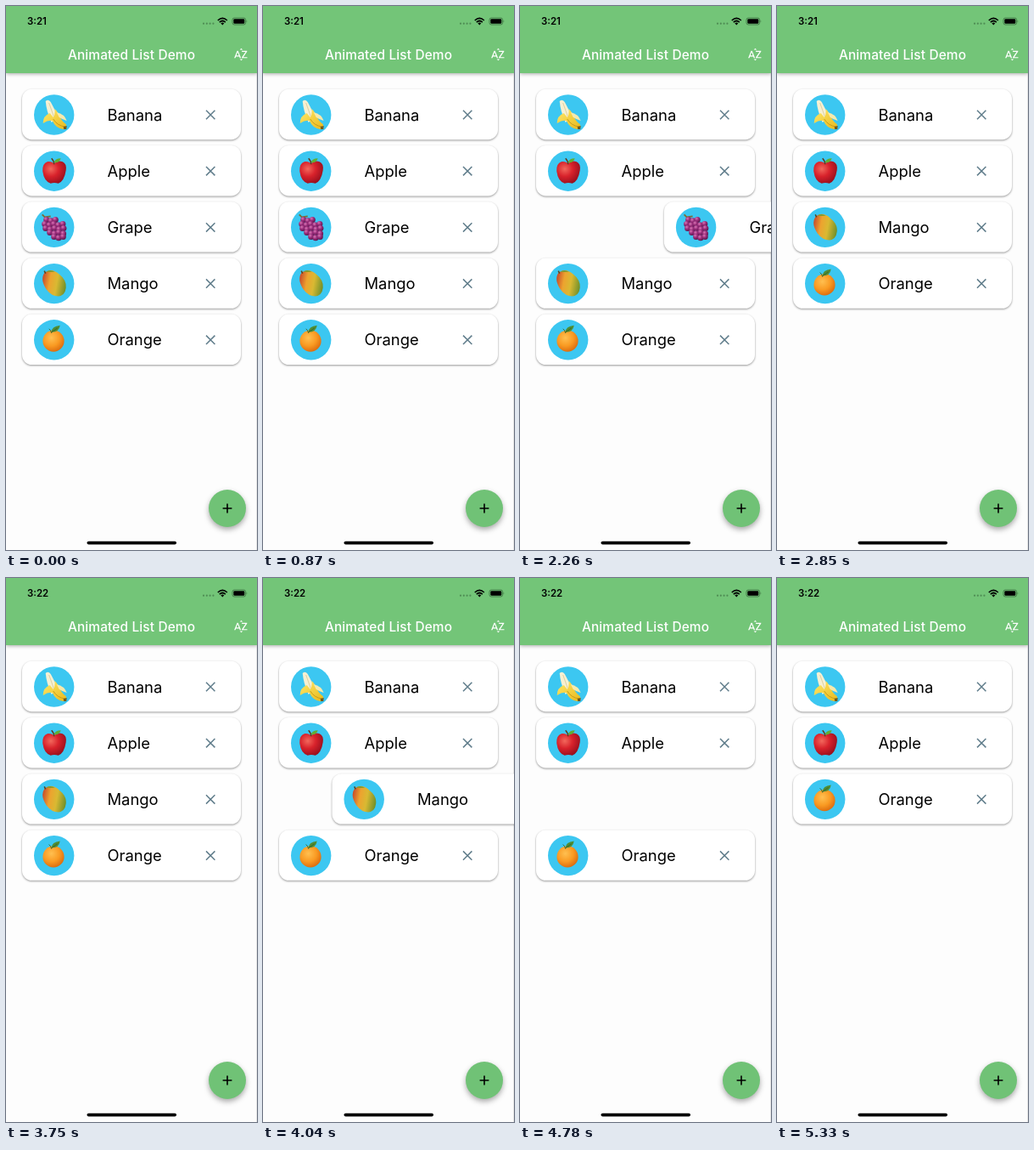
An HTML page for the animation above (6.03 s loop, 296 px wide and 640 px high).

```html
<!DOCTYPE html>
<html lang="en">
<head>
<meta charset="utf-8">
<title>Animated List Demo</title>
<style>
  html, body { margin: 0; width: 100%; height: 100%; overflow: hidden; background: #fdfdfd; }
  svg { display: block; width: 296px; height: 640px; font-family: Inter, Roboto, sans-serif; }
  .bar { filter: drop-shadow(0 1px 2px #0005); }
  .card { fill: #fff; filter: drop-shadow(0 1px 1px #0006); }
  .label { font-size: 18.4px; }
  .cross { fill: none; stroke: #607d8b; stroke-width: 1.5; }
  .fab { filter: drop-shadow(0 3px 3px #0005); }
</style>
</head>
<body>
<svg viewBox="0 0 296 640">
  <defs>
    <radialGradient id="red" cx=".35" cy=".35" r=".75">
      <stop stop-color="#f2685c"/><stop offset=".45" stop-color="#d8222b"/><stop offset="1" stop-color="#8f0d1c"/>
    </radialGradient>
    <radialGradient id="orange" cx=".4" cy=".35" r=".7">
      <stop stop-color="#ffc051"/><stop offset=".55" stop-color="#f99a22"/><stop offset="1" stop-color="#d9680d"/>
    </radialGradient>
    <radialGradient id="grape" cx=".35" cy=".3" r=".75">
      <stop stop-color="#d977b4"/><stop offset=".45" stop-color="#9c2f7d"/><stop offset="1" stop-color="#581449"/>
    </radialGradient>
    <linearGradient id="mango" x1="0" y1=".4" x2="1" y2=".6">
      <stop stop-color="#c9502b"/><stop offset=".3" stop-color="#eda32f"/>
      <stop offset=".6" stop-color="#d9b932"/><stop offset="1" stop-color="#71902a"/>
    </linearGradient>
    <linearGradient id="peel" x2="1" y2="1">
      <stop stop-color="#ffe96b"/><stop offset="1" stop-color="#e8b91c"/>
    </linearGradient>
  </defs>

  <rect width="296" height="640" fill="#fdfdfd"/>
  <path d="M295.5 79V640" stroke="#e6e6e6"/>
  <path class="bar" d="M0 0H296V79H0Z" fill="#73c578"/>
  <text id="clock" x="25" y="22.3" font-size="11.4" font-weight="600"></text>
  <g fill="#4f8c54">
    <circle cx="233" cy="20.7" r="1.1"/><circle cx="236.8" cy="20.7" r="1.1"/>
    <circle cx="240.6" cy="20.7" r="1.1"/><circle cx="244.4" cy="20.7" r="1.1"/>
  </g>
  <g fill="none" stroke="#000" stroke-width="1.7">
    <path d="M249.8 17Q255.3 11.8 260.8 17M251.8 19.1Q255.3 15.9 258.8 19.1"/>
  </g>
  <path d="M253.3 20.3Q255.3 18.6 257.3 20.3L255.3 22.4Z"/>
  <rect x="267" y="14" width="15.6" height="8" rx="2.3" fill="none" stroke="#3f7443" stroke-width=".9"/>
  <rect x="268.3" y="15.3" width="13" height="5.4" rx="1.2"/>
  <path d="M283.6 16.6Q285.2 18 283.6 19.4Z" fill="#3f7443"/>

  <text x="148" y="62.5" font-size="15.4" font-weight="500" letter-spacing=".15" text-anchor="middle" fill="#fff">Animated List Demo</text>
  <path transform="translate(267.9 47.9) scale(.759)" fill="#fff" d="M14.94 4.66h-4.72l2.36-2.36zM10.25 19.37h4.66l-2.33 2.33zM6.1 6.27L1.6 17.73h1.84l.92-2.45h5.11l.92 2.45h1.84L7.74 6.27zM4.97 13.64l1.94-5.18 1.94 5.18zM15.73 16.14h6.12v1.59h-8.53v-1.29l5.92-8.56h-5.88v-1.6h8.3v1.26z"/>

  <g id="list"></g>

  <circle class="fab" cx="261" cy="591" r="22" fill="#70c276"/>
  <path d="M255.6 591H266.4M261 585.6V596.4" stroke="#000" stroke-width="1.6"/>
  <rect x="95.5" y="629.7" width="105.5" height="3.8" rx="1.9"/>
</svg>
<script>
const LOOP = 6030, PITCH = 66.2, SPEED = 0.288, SLIDE = 1000;

// Removed items slide out linearly, then the rows below jump up.
const removeAt = { Grape: 1736, Mango: 3813 };
// Moments at which the screen refreshes.
const ticks = [0, 1830, 1930, 2040, 2150, 2260, 2460, 2630, 2740, 2850, 3020,
  3920, 4030, 4140, 4240, 4360, 4610, 4780, 4890, 5010];

const path = (d, fill, extra = '') => `<path d="${d}" fill="${fill}" ${extra}/>`;

function grapes() {
  const rows = [[-9, -9, 3], [-11, -4, 5], [-10, 1, 5], [-5, 6, 4], [0, 11, 3]];
  return path('M-14 -15L-8 -9M-11 -12L-4 -13', 'none', 'stroke="#7d6a35" stroke-width="1.8"') +
    rows.map(([x, y, n]) => Array.from({ length: n }, (_, i) =>
      `<circle cx="${x + i * 5.3}" cy="${y + i % 2 * 1.4}" r="3.5" fill="url(#grape)"/>`).join('')).join('');
}

const fruits = {
  Banana:
    path('M-10 -16Q-7 -19 -4 -15L5 2L-3 9Q-9 -4 -10 -16Z', '#f7f0d2') +
    path('M-6 -14L0 3', 'none', 'stroke="#ddd0a0"') +
    path('M-5 -2Q-13 1 -13 10Q-7 6 -2 7Q2 16 11 17Q16 16 14 11Q8 7 6 0Q3 -5 1 -7Q1 1 -1 3Z', 'url(#peel)') +
    path('M3 -3Q12 -1 15 7Q9 5 6 3Z', '#f6e9ac') +
    path('M-1 5Q4 13 13 14', 'none', 'stroke="#c99b16"') +
    path('M11 14L15 13L14.5 17L11.5 17Z', '#6e5a20'),
  Apple:
    path('M0 -9Q4 -13 10 -11Q15 -9 14 -1Q12 12 5 14.5Q0 13 -4 14.5Q-12 12 -13.5 0Q-14 -9 -8 -11Q-4 -12 0 -9Z', 'url(#red)') +
    path('M0 -8Q0 -12 -3 -15', 'none', 'stroke="#5b3a1d" stroke-width="1.5"') +
    path('M0 -10Q1 -15 8 -15Q6 -9 0 -10Z', '#5fae35'),
  Grape: grapes(),
  Mango:
    path('M-11 -13Q-3 -19 6 -11Q15 -4 14 5Q13 14 5 15Q-3 15 -9 7Q-17 -5 -11 -13Z', 'url(#mango)') +
    path('M-9 -14Q-5 -17 1 -14Q-5 -13 -9 -14Z', '#7e9c31') +
    path('M-10 -12L-11.5 -15', 'none', 'stroke="#59441f" stroke-width="1.5"'),
  Orange:
    '<circle cx="-.7" cy="1.3" r="12.6" fill="url(#orange)"/>' +
    path('M-3 -9Q-3 -16 7 -17Q6 -9 -3 -9Z', '#4f8d35') +
    path('M-3 -8Q-4 -12 -6 -13M-3 -9L4 -14', 'none', 'stroke="#38662a"')
};

const list = document.getElementById('list');
const clock = document.getElementById('clock');
const names = Object.keys(fruits);

list.innerHTML = names.map(name => `<g>
  <rect class="card" x="19" y="97.8" width="258" height="59.4" rx="11.5"/>
  <circle cx="56.7" cy="128" r="23.7" fill="#3cc7f1"/>
  <g transform="translate(56.7 128)">${fruits[name]}</g>
  <text class="label" x="119.5" y="134.6">${name}</text>
  <path class="cross" d="M236 122.8l10.4 10.4m0-10.4l-10.4 10.4"/>
</g>`).join('');

function draw(t) {
  let row = 0;
  names.forEach((name, i) => {
    const age = Math.max(0, t - (removeAt[name] ?? Infinity));
    const gone = age >= SLIDE;
    const card = list.children[i];
    card.setAttribute('visibility', gone ? 'hidden' : 'visible');
    card.setAttribute('transform', `translate(${age * SPEED} ${row * PITCH})`);
    if (!gone) row++;
  });
  clock.textContent = t < 3020 ? '3:21' : '3:22';
}

const start = performance.now();
function frame() {
  const t = (performance.now() - start) % LOOP;
  draw(ticks.findLast(tick => tick <= t) ?? 0);
  requestAnimationFrame(frame);
}
frame();
</script>
</body>
</html>
```
